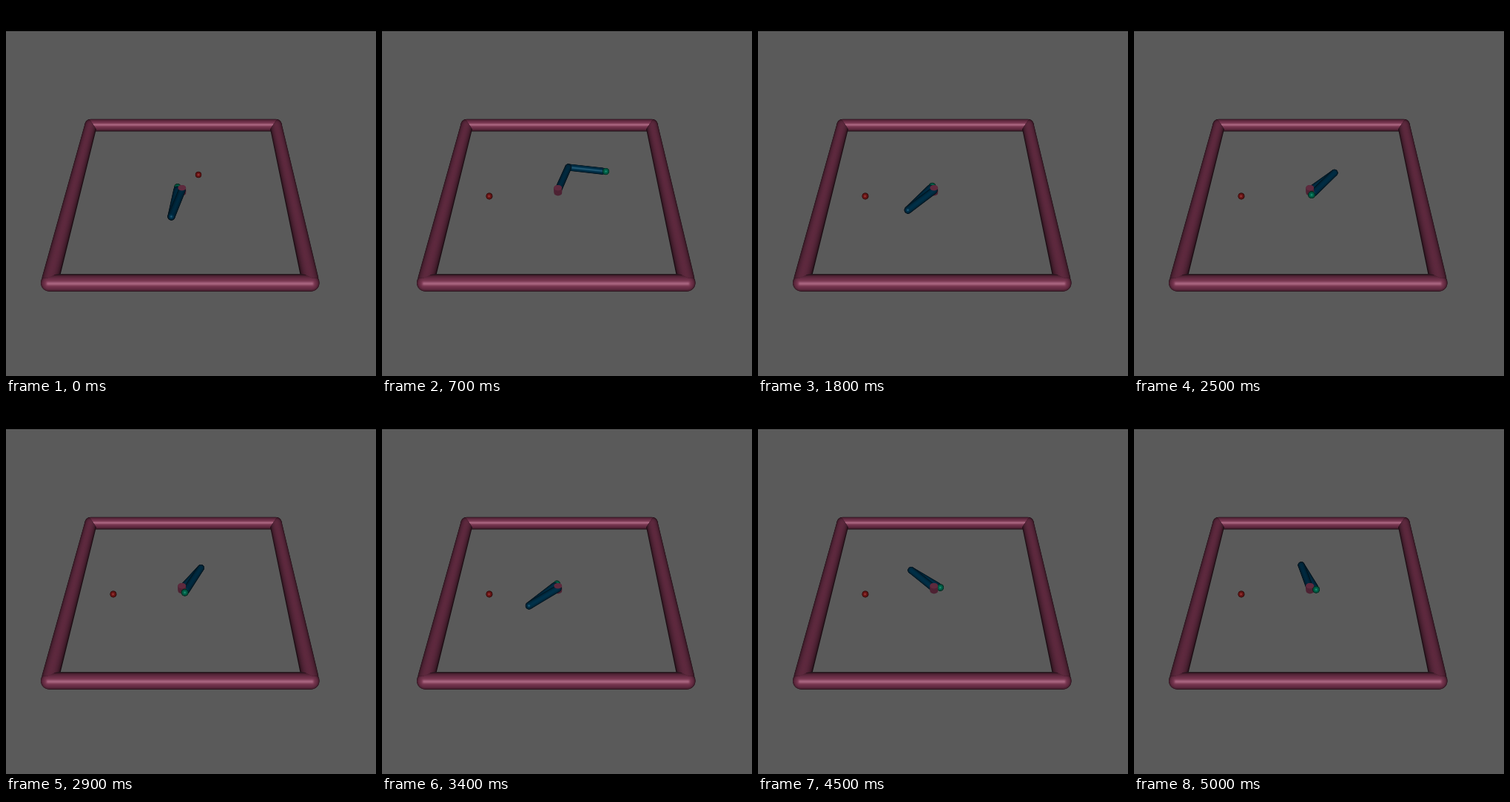
Recreate the animation shown at these times as an HTML page with a canvas. Size 500x500 px, loop 5100 ms.

```html
<!DOCTYPE html>
<html>
<head>
<meta charset="utf-8">
<style>
  html, body { margin: 0; width: 100%; height: 100%; overflow: hidden; background: #000; }
  canvas { display: block; }
</style>
</head>
<body>
<canvas id="stage" width="500" height="500"></canvas>
<script>
const ctx = document.getElementById('stage').getContext('2d');
const FOCAL = 603.6, C45 = Math.SQRT1_2, RAD = Math.PI / 180;
const PINK = [230, 102, 153], BLUE = [0, 102, 153], TEAL = [0, 204, 153], RED = [230, 51, 51];
const STEP = 100, STEPS = 51, SHADES = 18;
const WALL = 0.3, WALL_R = 0.02, LINK = 0.1;

// Camera looks down at 45 degrees; z is measured from the arm's plane.
function project([x, y, z = 0]) {
  const depth = 1.238 + C45 * (y - z), scale = FOCAL / depth;
  return { x: 250 + (x - 0.025) * scale, y: 250 - (0.0015 + C45 * (y + z)) * scale, scale };
}

// Headlight: ambient, diffuse and a specular spot.
function shade(rgb, n) {
  const spec = 50 * n ** 36;
  return `rgb(${rgb.map(c => Math.round(c * (0.11 + 0.42 * n) + spec))})`;
}

// Outline around two circles.
function hull(a, b) {
  const dx = b.x - a.x, dy = b.y - a.y, dist = Math.hypot(dx, dy);
  ctx.beginPath();
  if (dist <= Math.abs(a.r - b.r) + 1e-6) {
    ctx.arc(a.x, a.y, Math.max(a.r, b.r), 0, 7);
  } else {
    const dir = Math.atan2(dy, dx), tangent = Math.acos((a.r - b.r) / dist);
    ctx.arc(a.x, a.y, a.r, dir + tangent, dir - tangent + 2 * Math.PI);
    ctx.arc(b.x, b.y, b.r, dir - tangent, dir + tangent);
  }
  ctx.fill();
}

// One shading contour; perspective pushes it away from the view centre.
function contour(p, radius, s, n) {
  const r = radius * p.scale, push = r * n / FOCAL / 2;
  return { x: p.x + (p.x - 250) * push, y: p.y + (p.y - 250) * push, r: r * s };
}

// Nested contours from the given rim inwards; facing dims tilted tubes.
function contours(a, b, radius, rgb, rim, facing) {
  for (let i = SHADES; i > 0; i--) {
    const s = rim * i / SHADES, n = Math.sqrt(1 - s * s);
    ctx.fillStyle = shade(rgb, n * facing);
    hull(contour(a, radius, s, n), contour(b, radius, s, n));
  }
}

function tilt(a, b) {
  const length = Math.hypot(b[0] - a[0], b[1] - a[1]);
  return Math.sqrt(1 - ((b[1] - a[1]) / length) ** 2 / 2);
}

const tube = (a, b, radius, rgb) =>
  contours(project(a), project(b), radius, rgb, 1, tilt(a, b));

function sphere(p, radius, rgb, rim = 1) {
  const c = project(p);
  contours(c, c, radius, rgb, rim, 1);
}

// The rounded end towards the camera catches more light.
function link(a, b) {
  tube(a, b, 0.01, BLUE);
  sphere(a[1] < b[1] ? a : b, 0.01, BLUE, Math.sqrt(1 - tilt(a, b) ** 2));
}

function disc(z, color) {
  const p = project([0, 0, z]), r = 0.011 * p.scale;
  ctx.fillStyle = color;
  ctx.beginPath();
  ctx.ellipse(p.x, p.y, r, r * C45, 0, 0, 7);
  ctx.fill();
}

function pivot() {
  for (let i = 0; i <= 8; i++) disc(-0.01 + i * 0.0025, shade(PINK, 0.55));
}

// Side walls meet the front and back ones in a mitre.
function sideWall(side) {
  const rim = WALL_R * C45, inner = WALL - rim;
  const outline = [
    [0.36, 0.36], [WALL, WALL, WALL_R], [WALL - WALL_R, WALL - WALL_R], [0.25, inner, -rim],
    [0.25, -inner, rim], [inner, -inner, rim], [WALL, -WALL, WALL_R], [0.36, -WALL, WALL_R]
  ];
  ctx.save();
  ctx.beginPath();
  for (const [x, y, z] of outline) {
    const p = project([side * x, y, z]);
    ctx.lineTo(p.x, p.y);
  }
  ctx.clip();
  tube([side * WALL, WALL], [side * WALL, -WALL], WALL_R, PINK);
  ctx.restore();
}

// Angle travelled under constant torque with damping.
const spin = n => 229.18 * (n - 50 * (1 - Math.exp(-n / 50)));

function pose(step) {
  if (step === 0) return { shoulder: 254.7, elbow: -172, target: [0.0463, 0.0637] };
  const n = step - 1, hit = 8.8, after = n - hit;
  return {
    shoulder: spin(n) - 6,
    elbow: after < 0 ? -3.3 - spin(n) : -172 - 36 * after * Math.exp(-after),
    target: [-0.1876, -0.022]
  };
}

const reach = ([x, y], angle, length) =>
  [x + length * Math.cos(angle * RAD), y + length * Math.sin(angle * RAD)];

function draw(step) {
  const { shoulder, elbow, target } = pose(step);
  ctx.fillStyle = '#000';
  ctx.fillRect(0, 0, 500, 500);
  ctx.fillStyle = '#5a5a5a';
  ctx.fillRect(0, 34, 500, 466);

  for (const y of [WALL, -WALL]) tube([-WALL, y], [WALL, y], WALL_R, PINK);
  sideWall(-1);
  sideWall(1);

  const base = [0, 0], joint = reach(base, shoulder, LINK);
  const wrist = reach(joint, shoulder + elbow, LINK);
  const tip = reach(joint, shoulder + elbow, 0.11);
  const parts = [
    { y: 0, paint: pivot },
    { y: joint[1] / 2, paint: () => link(base, joint) },
    { y: (joint[1] + wrist[1]) / 2, paint: () => link(joint, wrist) },
    { y: tip[1], paint: () => sphere(tip, 0.01, TEAL) },
    { y: target[1], paint: () => sphere(target, 0.009, RED) }
  ];
  parts.sort((p, q) => q.y - p.y).forEach(p => p.paint());
  disc(0.01, shade(PINK, C45));
}

let shown = -1;
const start = performance.now();
function tick() {
  const step = Math.floor((performance.now() - start) / STEP) % STEPS;
  if (step !== shown) draw(shown = step);
  requestAnimationFrame(tick);
}
tick();
</script>
</body>
</html>
```
